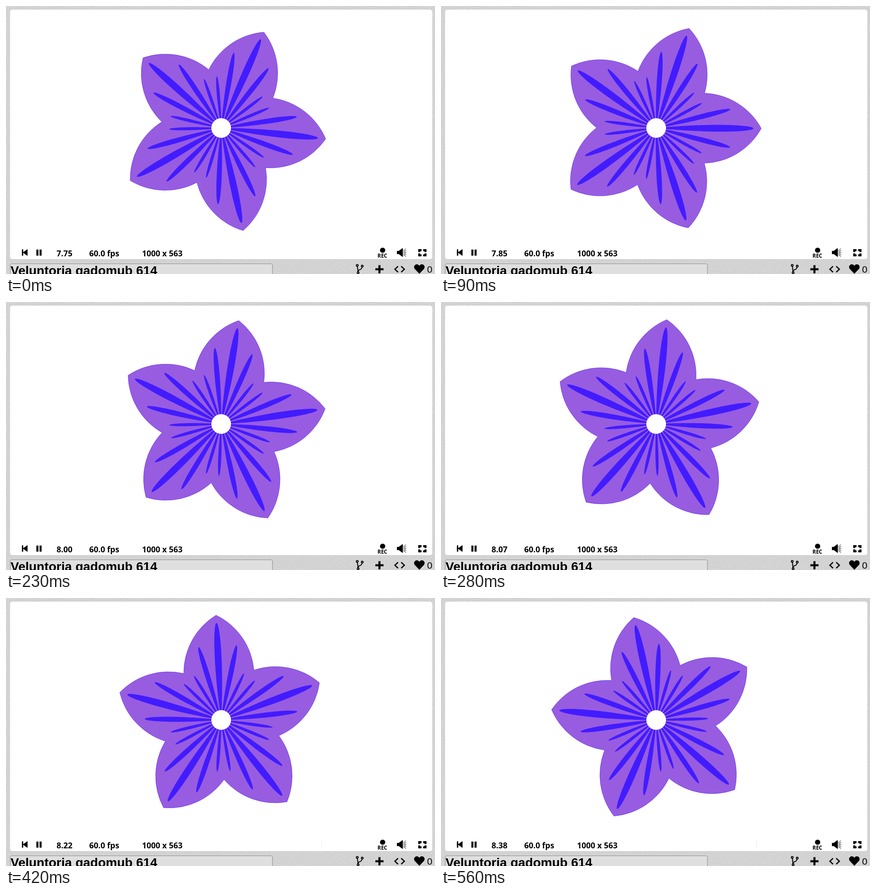
These frames come from a looping animation (946x592 px, 0.58 s). An HTML page with a canvas:

```html
<!DOCTYPE html>
<html lang="en">
<head>
<meta charset="utf-8">
<title>Rotating flower</title>
<style>
  html, body { margin: 0; width: 946px; height: 592px; overflow: hidden; background: #d3d3d3; }
  svg, canvas { position: absolute; left: 0; top: 0; }
  .status { font: bold 17.5px "Noto Sans", "Open Sans", sans-serif; }
  .title { font: bold 28px "Liberation Sans", Arial, sans-serif; }
  .likes { font: 21px "Liberation Sans", Arial, sans-serif; }
  .rec { font: bold 11.5px "Noto Sans", "Open Sans", sans-serif; }
  .line { fill: none; stroke: #000; }
</style>
</head>
<body>
<svg width="946" height="592">
  <filter id="paper" x="0" y="0" width="100%" height="100%" color-interpolation-filters="sRGB">
    <feTurbulence type="fractalNoise" baseFrequency=".35" numOctaves="2" seed="4"/>
    <feColorMatrix values=".08 0 0 0 .787  .08 0 0 0 .787  .08 0 0 0 .787  0 0 0 0 1"/>
  </filter>
  <rect width="946" height="592" filter="url(#paper)"/>
  <rect x="9" y="8" width="931" height="551" rx="5" fill="#fff"/>
  <path id="divider" d="M695.5 532V553" stroke="#eaeaea"/>

  <path d="M35 537.500h3v6.200l9.500-6.700v15l-9.500-6.700v6.200h-3zM67 538h4.500v13.500h-4.500zM74 538h4.500v13.500h-4.500z"/>
  <g class="status">
    <text id="clock" x="111.500" y="553"></text>
    <text x="183.500" y="553">60.0 fps</text>
    <text x="300" y="553">1000 x 563</text>
  </g>

  <circle cx="830.500" cy="539.500" r="5.800"/>
  <text class="rec" x="830" y="556" text-anchor="middle">REC</text>
  <path d="M862 541h4l9-6.500v20l-9-6.500h-4z"/>
  <path class="line" d="M876 541l6-5M876.500 543l6-2.500M876.500 545h6.500M876.500 547l6 2.500M876 549l6 4.500"/>
  <path class="line" stroke-width="4.500" d="M911.300 543.500v-4.300h5M920 539.200h5v4.300M925 546.500v4.300h-5M916.300 550.800h-5v-4.300"/>

  <rect x="9.500" y="569.500" width="578" height="40" rx="3" fill="#dfdfdf" stroke="#8c8c8c"/>
  <text class="title" x="10" y="594">Veluntoria gadomub 614</text>

  <g class="line" stroke-width="2">
    <circle cx="774.500" cy="573" r="2"/>
    <circle cx="785.500" cy="574.500" r="2"/>
    <circle cx="776.500" cy="589" r="2"/>
    <path d="M774.800 575l1.500 12M785 577q-.5 4-4 5t-5 4"/>
  </g>
  <path class="line" stroke-width="4.500" d="M814.500 581.500h18M823.500 572.500v18"/>
  <path class="line" stroke-width="2.500" d="M864.500 575l-7 6.500 7 6.500M871.500 575l7 6.500-7 6.500"/>
  <path d="M911.500 591.500l-10-10.500c-4-5 0-10.500 4.500-10.500q3.500 0 5.500 3.500 2-3.500 5.500-3.500c4.500 0 8.500 5.500 4.500 10.500z"/>
  <text class="likes" x="928.500" y="589">0</text>
</svg>
<canvas id="flower" width="946" height="592"></canvas>
<script>
const LOOP = 580;
const STEPS = [0, 60, 90, 140, 170, 230, 280, 310, 340, 390, 420, 450, 500, 530, 560];
const PETALS = 5, VEINS = 25;
const VEIN_KINDS = [[214.5, 16], [168.5, 17], [114.5, 19]]; // length, sharpness
const ctx = document.getElementById("flower").getContext("2d");
const clock = document.getElementById("clock");
const divider = document.getElementById("divider");

// Each petal is bounded by two circular arcs that meet at its tip.
function petalPath() {
  const cx = 101, cy = 71.5, radius = 149;
  const notch = Math.atan2(149.1, 5.8);
  const tip = Math.asin(cy / radius);
  ctx.beginPath();
  for (let i = 0; i < PETALS; i++) {
    ctx.arc(cx, cy, radius, -notch, -tip);
    ctx.arc(cx, -cy, radius, tip, notch);
    ctx.rotate(2 * Math.PI / PETALS);
  }
  ctx.closePath();
}

// Polar curve r = length * cos(sharpness * angle).
function drawVein([length, sharpness]) {
  ctx.beginPath();
  for (let i = -30; i <= 30; i++) {
    const phase = i / 60 * Math.PI;
    const r = length * Math.cos(phase), angle = phase / sharpness;
    ctx.lineTo(r * Math.cos(angle), r * Math.sin(angle));
  }
  ctx.fill();
}

function drawFlower(angle) {
  ctx.clearRect(0, 0, 946, 592);
  ctx.save();
  ctx.translate(474.5, 269.5);
  ctx.rotate(angle);
  petalPath();
  ctx.fillStyle = "#985ce0";
  ctx.fill();
  ctx.strokeStyle = "#421cff";
  ctx.lineWidth = 0.6;
  ctx.stroke();
  ctx.fillStyle = "#421cff";
  for (let i = 0; i < VEINS; i++) {
    const offset = i % 5;
    drawVein(VEIN_KINDS[Math.min(offset, 5 - offset)]);
    ctx.rotate(2 * Math.PI / VEINS);
  }
  ctx.beginPath();
  ctx.arc(0, 0, 21.7, 0, 2 * Math.PI);
  ctx.fillStyle = "#fff";
  ctx.fill();
  ctx.restore();
}

function render() {
  const now = performance.now() % LOOP;
  const step = STEPS.findLast(start => start <= now);
  // The clock advances in whole sixtieths of a second.
  const seconds = Math.floor(465.15 + step * 0.0678) / 60;
  drawFlower(2.5 * Math.PI - seconds);
  clock.textContent = seconds.toFixed(2);
  divider.style.visibility = step >= 390 ? "visible" : "hidden";
  requestAnimationFrame(render);
}
render();
</script>
</body>
</html>
```
